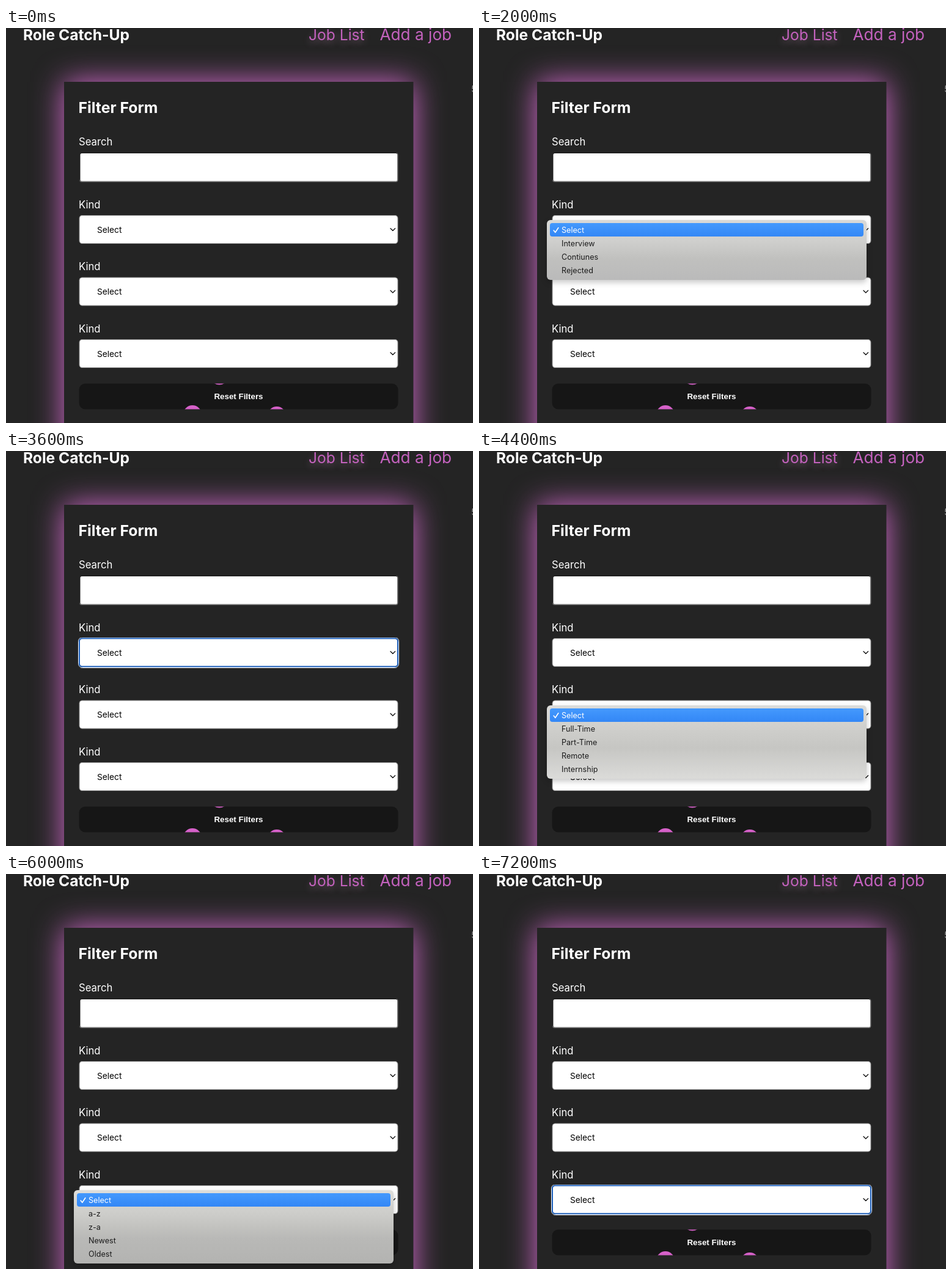
Recreate the animation shown at these times as an HTML page. Size 764x646 px, loop 8 s.

```html
<!DOCTYPE html>
<html lang="en">
<head>
<meta charset="utf-8">
<title>Filter form</title>
<style>
  html, body { margin: 0; width: 100%; height: 100%; overflow: hidden; background: #242424; }
  svg { display: block; width: 764px; height: 646px; font-family: Inter, "Open Sans", sans-serif; }
  text { white-space: pre; }

  .glow { fill: #d66bd0; filter: blur(25px); }
  .brand { font-size: 24.6px; font-weight: 700; fill: #fff; }
  .link { fill: #c462be; }
  .lit { text-shadow: 0 4px 12px rgba(220, 160, 205, .4); }
  .heading { font-size: 24.8px; font-weight: 700; fill: #fff; }
  .label { font-size: 16.7px; fill: #fff; }
  .value { font-size: 13.7px; fill: #000; }
  .button { font: 700 13.33px "Liberation Sans", Arial, sans-serif; fill: #fff; text-anchor: middle; }
  .dots { fill: #d661c9; }
  .chevron, .tick { fill: none; stroke: #111; stroke-width: 1.3; stroke-linecap: round; stroke-linejoin: round; }
  .tick { stroke-width: 1.6; }
  .option { font-size: 12.6px; fill: #1c1c1c; }
  .hover .option { fill: #fff; }
  .hover .tick { stroke: #fff; }
  .sheet { filter: drop-shadow(0 4px 5px rgba(0, 0, 0, .22)); }

  .menu, .ring { opacity: 0; }
  .menu, .hover, .ring { animation: 8s step-end infinite; }
  .menu0 { animation-name: menu0; }
  .menu1 { animation-name: menu1; }
  .menu2 { animation-name: menu2; }
  .hover0 { animation-name: hover0; }
  .hover1 { animation-name: hover1; }
  .hover2 { animation-name: hover2; }
  .ring0 { animation-name: ring0; }
  .ring1 { animation-name: ring1; }
  .ring2 { animation-name: ring2; }

  @keyframes menu0 { 0% { opacity: 0 } 25% { opacity: 1 } 42.5% { opacity: .68 } 43.75% { opacity: .3 } 45%, 100% { opacity: 0 } }
  @keyframes menu1 { 0% { opacity: 0 } 55% { opacity: 1 } 65% { opacity: .68 } 66.25% { opacity: .35 } 67.5% { opacity: .1 } 68.75%, 100% { opacity: 0 } }
  @keyframes menu2 { 0% { opacity: 0 } 75% { opacity: 1 } 87.5% { opacity: .68 } 88.75% { opacity: .3 } 90%, 100% { opacity: 0 } }
  @keyframes hover0 { 0% { opacity: 1 } 38.75%, 100% { opacity: 0 } }
  @keyframes hover1 { 0% { opacity: 1 } 61.25%, 100% { opacity: 0 } }
  @keyframes hover2 { 0% { opacity: 1 } 86.25%, 100% { opacity: 0 } }
  @keyframes ring0 { 0% { opacity: 0 } 45% { opacity: 1 } 53.75%, 100% { opacity: 0 } }
  @keyframes ring1 { 0% { opacity: 0 } 68.75% { opacity: 1 } 75%, 100% { opacity: 0 } }
  @keyframes ring2 { 0% { opacity: 0 } 90%, 100% { opacity: 1 } }
</style>
</head>
<body>
<svg viewBox="0 0 764 646">
  <defs>
    <clipPath id="pill"><rect x="119.5" y="581.5" width="522" height="42" rx="10"/></clipPath>
    <linearGradient id="blue" x2="0" y2="1"><stop stop-color="#4499fd"/><stop offset="1" stop-color="#3387f6"/></linearGradient>
    <linearGradient id="tone0" x2="0" y2="1">
      <stop stop-color="#d9d9d7"/><stop offset=".35" stop-color="#cfcfcd"/>
      <stop offset=".65" stop-color="#c0c0be"/><stop offset="1" stop-color="#bababa"/>
    </linearGradient>
    <linearGradient id="tone1" x2="0" y2="1">
      <stop stop-color="#dcdcda"/><stop offset=".3" stop-color="#cfcfcc"/>
      <stop offset=".58" stop-color="#c6c6c3"/><stop offset="1" stop-color="#dbdbd9"/>
    </linearGradient>
    <linearGradient id="tone2" x2="0" y2="1">
      <stop stop-color="#dededb"/><stop offset=".35" stop-color="#cbcbc8"/>
      <stop offset=".65" stop-color="#b9b9b7"/><stop offset="1" stop-color="#b3b3b1"/>
    </linearGradient>
  </defs>

  <rect class="glow" x="95" y="88" width="571.5" height="900"/>
  <rect x="95" y="88" width="571.5" height="900" fill="#242424"/>

  <text class="brand" x="28" y="20">Role Catch-Up</text>
  <text class="link lit" x="495" y="20" font-size="24.6">Job List</text>
  <text class="link" x="611.5" y="20" font-size="26.2">Add a job</text>
  <text x="761.3" y="105" font-size="14" fill="#a0a0a0">5</text>

  <text class="heading" x="118.5" y="139">Filter Form</text>
  <text class="label" x="119" y="191.5">Search</text>
  <rect x="120" y="204" width="521.5" height="48" rx="4" fill="#777"/>
  <rect x="120" y="203.5" width="520" height="47" rx="4" fill="#1d1d1d"/>
  <rect x="121.5" y="205" width="518.5" height="45.5" rx="2.5" fill="#fff"/>

  <g id="fields"></g>

  <g clip-path="url(#pill)">
    <rect x="119" y="581" width="523" height="43" fill="#161616"/>
    <g class="dots">
      <circle cx="349" cy="568.5" r="15"/>
      <circle cx="305" cy="632" r="15"/>
      <circle cx="443" cy="634" r="15"/>
    </g>
  </g>
  <text class="button" x="380.5" y="607">Reset Filters</text>

  <g id="menus"></g>
</svg>
<script>
  const lists = [
    { y: 306.5, top: 314, items: ['Interview', 'Contiunes', 'Rejected'] },
    { y: 408, top: 416, items: ['Full-Time', 'Part-Time', 'Remote', 'Internship'] },
    { y: 509.5, top: 517, items: ['a-z', 'z-a', 'Newest', 'Oldest'] }
  ];
  const row = 22;

  const field = ({ y }, i) => `
    <g transform="translate(0 ${y})">
      <text class="label" x="119" y="-12">Kind</text>
      <rect x="120" y="0" width="521" height="46" rx="4.5" fill="#fff" stroke="#858585"/>
      <g class="ring ring${i}" fill="none">
        <rect x="118.5" y="-1.5" width="524" height="49" rx="6" stroke="#fff"/>
        <rect x="120" y="0" width="521" height="46" rx="4.5" stroke="#1a5cb8" stroke-width="2"/>
      </g>
      <text class="value" x="149" y="28">Select</text>
      <path class="chevron" d="M629 21.2l3.8 3.8 3.8-3.8"/>
    </g>`;

  const option = (label, k) =>
    `<text class="option" x="24" y="${21 + row * k}">${label}</text>`;

  const chosen = option('Select', 0) + '<path class="tick" d="M11.2 17l2.6 3.3 5-7.6"/>';

  const menu = ({ top, items }, i) => `
    <g class="menu menu${i}" transform="translate(111 ${top})">
      <rect class="sheet" width="523" height="${(items.length + 1) * row + 10}" rx="6" fill="url(#tone${i})"/>
      ${chosen}
      ${items.map((label, k) => option(label, k + 1)).join('')}
      <g class="hover hover${i}">
        <rect x="5" y="5" width="513" height="${row}" rx="4" fill="url(#blue)"/>
        ${chosen}
      </g>
    </g>`;

  document.getElementById('fields').innerHTML = lists.map(field).join('');
  document.getElementById('menus').innerHTML = lists.map(menu).join('');
</script>
</body>
</html>
```
